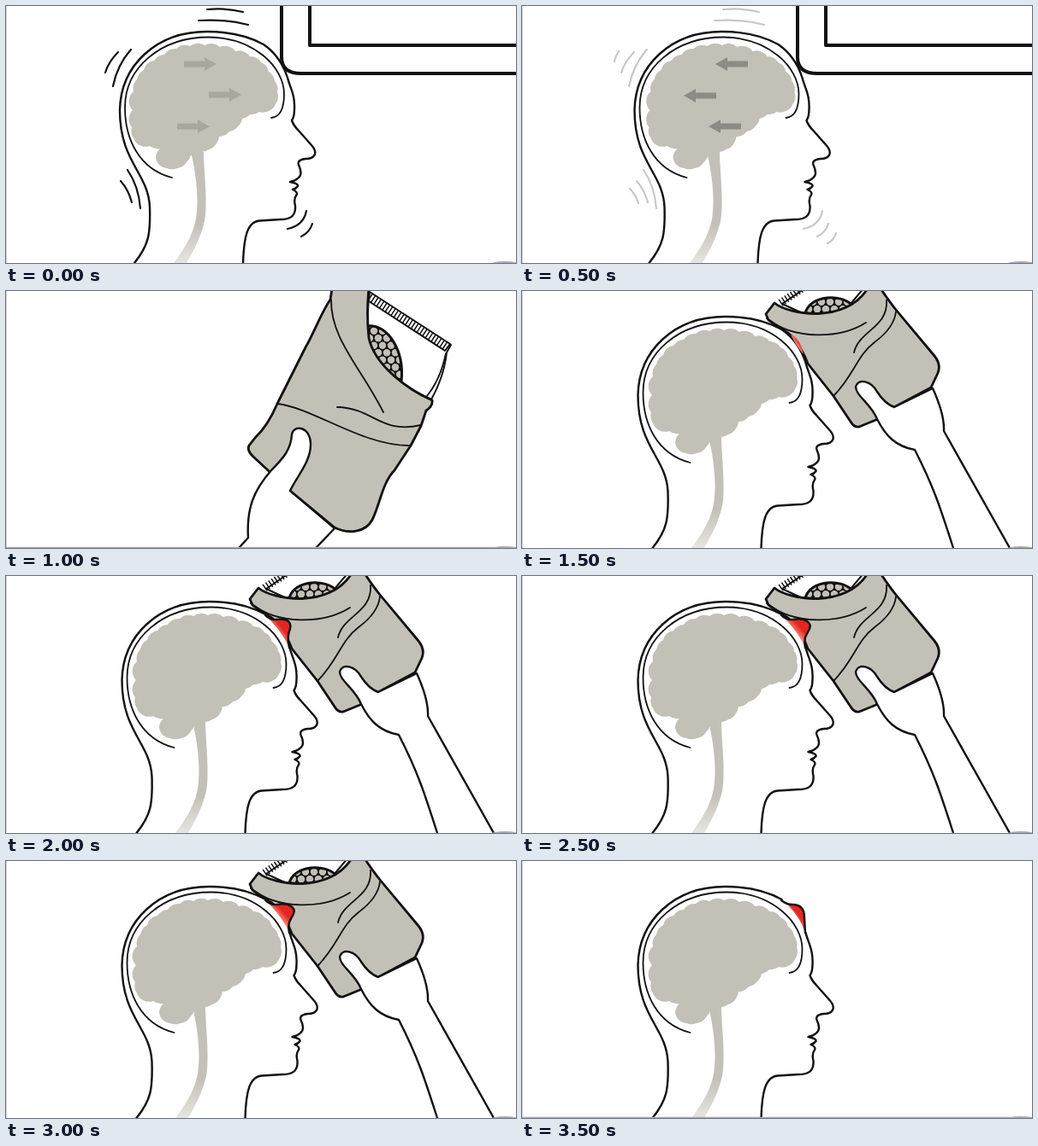
These frames come from a looping animation (596 px wide and 301 px high, 4000 ms). An HTML page:

```html
<!DOCTYPE html>
<html lang="en">
<head>
<meta charset="utf-8">
<style>
  html, body { margin: 0; width: 100%; height: 100%; overflow: hidden; background: #fff; }
  svg { display: block; width: 596px; height: 301px; }
  path { stroke-linecap: round; stroke-linejoin: round; }
  .line { fill: none; stroke: #111; stroke-width: 2.4; }
  .thin { fill: none; stroke: #111; stroke-width: 1.8; }
  .gray { fill: #c3c0b7; }
  .cloth { fill: #c3c0b7; stroke: #111; stroke-width: 2.8; }
  .white { fill: #fff; stroke: #111; stroke-width: 2; }
  .peas { fill: url(#peas); stroke: #111; stroke-width: 3; }
  .ridges { fill: none; stroke: #111; stroke-dasharray: 1.5 2.5; }
  path.ridges { stroke-linecap: butt; }
</style>
</head>
<body>
<svg viewBox="0 0 596 301">
  <defs>
    <linearGradient id="stemFade" x1="0" y1="0" x2="0" y2="1">
      <stop offset=".65" stop-color="#c3c0b7"/><stop offset="1" stop-color="#e6e5e1"/>
    </linearGradient>
    <linearGradient id="sore" x1="1" y1="0" x2="0" y2="1">
      <stop offset=".36" stop-color="#e5261f"/><stop offset=".48" stop-color="#f06a62"/>
      <stop offset=".62" stop-color="#fbd3cf"/>
    </linearGradient>
    <pattern id="peas" width="10" height="17" patternUnits="userSpaceOnUse">
      <rect width="10" height="17" fill="#111"/>
      <g class="gray">
        <circle cx="5" cy="4.25" r="4.2"/><circle cx="0" cy="12.75" r="4.2"/><circle cx="10" cy="12.75" r="4.2"/>
      </g>
    </pattern>
  </defs>
  <rect width="596" height="301" fill="#fff"/>

  <g data-steps="01" fill="none" stroke="#111" stroke-width="4">
    <path d="M322 -4V60Q322 79 345 79H600"/>
    <path d="M355 -4V46H600"/>
  </g>

  <g data-steps="0134567">
    <path id="stem" fill="url(#stemFade)" d="M216 171H231C231 190 235 220 233 245C231 263 222 282 211 301H196C211 281 222 262 223 240C225 220 221 190 216 171Z"/>
    <path id="brain" class="gray"/>
    <g id="head">
      <path id="skull" class="line"/>
      <path class="thin" d="M194 201C155 191 139 155 139 119C139 72 181 36.500 237 36.500C290 37 325 72 325 103C325 121 320 130 310 131"/>
    </g>
  </g>

  <path id="arrows"/>
  <path id="shakes" fill="none" stroke-width="2.2"/>

  <g data-steps="2">
    <path class="white" d="M424 2L520 63L515 72Q512 100 497 127L420 90Z"/>
    <path class="thin" d="M514 73Q508 103 492 123"/>
    <path class="peas" d="M422 41C446 38 466 70 462 106L420 86Z"/>
    <path class="white" d="M425 1L519 62L513 70L424 12Z"/>
    <path class="ridges" stroke-width="9" d="M425 7L516 66"/>
    <path class="cloth" d="M381 -3L379 10C368 26 360 49 350 66L317 132Q306 158 291 172L284 181Q281 187 290 195L332 234L384 277C400 285 420 283 428 268C437 250 440 224 454 210L473 181L485 158L491 140Q499 135 498 128C471 116 431 88 424 55Q421 26 424 -3Z"/>
    <path class="thin" d="M380 10C379 56 415 90 441 142M387 136C430 137 437 168 485 157M317 132C360 137 417 182 473 181"/>
    <path class="line" style="fill:#fff" d="M272 301L283 289C281 255 289 234 310 210C325 195 333 185 334 168C336 156 356 158 356 180C356 200 340 217 332 234L384 278L362 301"/>
  </g>

  <g data-steps="3456">
    <path class="white" d="M304 15L332 -4H400L384 15L330 27Z"/>
    <path class="ridges" stroke-width="9" d="M302 14L335 -8"/>
    <path class="peas" d="M331 26C337 4 374 3 386 17L370 30Z"/>
    <path class="cloth" d="M285 27L295 14C312 28 378 39 404 -3H419Q429 12 437 22L482 76Q490 86 486 96L478 113L435 136L416 150L394 159Q388 160 384 153L364 123L334 85C327 67 319 53 306 46L288 34Z"/>
    <path class="thin" d="M286 32C318 58 372 56 402 37M388 72C394 46 428 43 426 11M364 123C388 99 391 76 412 60Q435 43 437 24"/>
    <path class="line" style="fill:#fff" d="M504 301C489 254 481 229 459 186C437 182 425 170 415 150C408 132 390 123 390 112C393 102 408 105 415 118Q424 132 435 136L480 114Q494 145 493 164L570 301"/>
  </g>

  <path id="bump" fill="url(#sore)"/>
  <path id="bumpLine" class="line"/>

  <path d="M.5 0V301" stroke="#d4d4d4"/>
  <path data-steps="27" d="M0 300.500H596" stroke="#aaa" stroke-width="1.500"/>
  <ellipse cx="583" cy="303.500" rx="18" ry="4.500" fill="#aaa"/>
</svg>
<script>
const STEP = 500, STEPS = 8;
const $ = id => document.getElementById(id);
const shift = (id, x) => $(id).setAttribute('transform', `translate(${x})`);
const draw = (id, d) => $(id).setAttribute('d', d);

const lobes = [
  [148,122],[149,100],[153,86],[161,75],[173,64],[185,57],[199,50],[215,47],[232,46],[250,48],
  [268,53],[285,59],[298,66],[307,77],[314,88],[317,101],[315,115],[307,123],[296,124],[285,127],
  [276,132],[271,141],[261,147],[249,153],[246,161],[237,168],[225,171],[216,175],[211,183],
  [200,190],[188,190],[179,186],[175,177],[180,167],[168,164],[156,163],[149,155],[147,142]
];
draw('brain', `M${lobes.join('A15 15 0 0 1 ')}A15 15 0 0 1 ${lobes[0]}Z`);

const back = 'M150 301C167 280 169 267 168 235C166 195 133 183 133 122C134 70 175 30 235 30Q274 30 301 45';
const front = '329 84C332 96 338 104 337 121Q337 130 334 134Q336 140 342 146L357 163C365 172 361 179 350 179' +
  'Q340 180 342 186Q347 197 342 201Q338 205 332 206Q342 208 341 211Q339 214 335 215Q342 218 339 222' +
  'Q336 226 338 234C339 247 331 250 320 250L296 251.500C282 253 278 270 277 301';

// Outer contour of the swelling; the inner edge closes the coloured area.
const bumps = {
  3: ['M314 51Q325 55 329 74', 'Q322 67 314 51Z'],
  4: ['M303 46Q309 52 316 51C329 49 334 54 332 62Q328 71 331 84', 'Q324 68 310 53Z'],
  5: ['M303 46Q309 52 317 51C331 48 339 55 336 62C331 71 329 74 331 84', 'Q324 68 310 53Z'],
  7: ['M303 46Q309 51 316 51C326 51 330 57 330 66L331 84', 'Q325 66 311 52Z']
};
bumps[6] = bumps[5];

const arrow = (tail, y, dir) =>
  `M${tail} ${y - 3.5}h${dir * 24}v-4.5l${dir * 14} 8l${-dir * 14} 8v-4.5h${-dir * 24}z`;
const arrowSets = [
  [[208, 68], [237, 104], [200, 141]].map(([x, y]) => arrow(x, y, 1)).join(''),
  [[264, 68], [227, 105], [256, 141]].map(([x, y]) => arrow(x, y, -1)).join('')
];

const shakes = 'M235 4Q257 2 277 7M225 17Q255 15 283 22M146 51Q130 69 125 94M131 54Q120 65 116 78' +
  'M134 205Q143 215 147 230M142 192Q155 211 157 237M351 240Q348 257 329 261M358 255Q355 265 345 270';
const extraShakes = 'M113 53Q109 59 108 65M126 214Q133 221 136 231M367 266Q365 274 357 278';

function show(step) {
  for (const el of document.querySelectorAll('[data-steps]'))
    el.style.display = el.dataset.steps.includes(step) ? '' : 'none';

  shift('head', [0, -1.5][step] ?? 2.5);
  shift('brain', [0, 1.5][step] ?? 4);
  shift('stem', step > 1 ? 2 : 0);

  const swollen = step > 3;
  draw('skull', back + (swollen ? 'M' : 'Q321 59 ') + front);
  const [outer, inner] = bumps[step] || ['', ''];
  draw('bump', outer + inner);
  draw('bumpLine', swollen ? outer : '');

  draw('arrows', arrowSets[step] || '');
  $('arrows').setAttribute('fill', step ? '#8e8b86' : '#a9a69f');
  draw('shakes', step > 1 ? '' : shakes + (step ? extraShakes : ''));
  $('shakes').setAttribute('stroke', step ? '#c8c8c8' : '#111');
}

let current = -1;
function tick() {
  const step = Math.floor(performance.now() / STEP) % STEPS;
  if (step !== current) show(current = step);
  requestAnimationFrame(tick);
}
tick();
</script>
</body>
</html>
```
